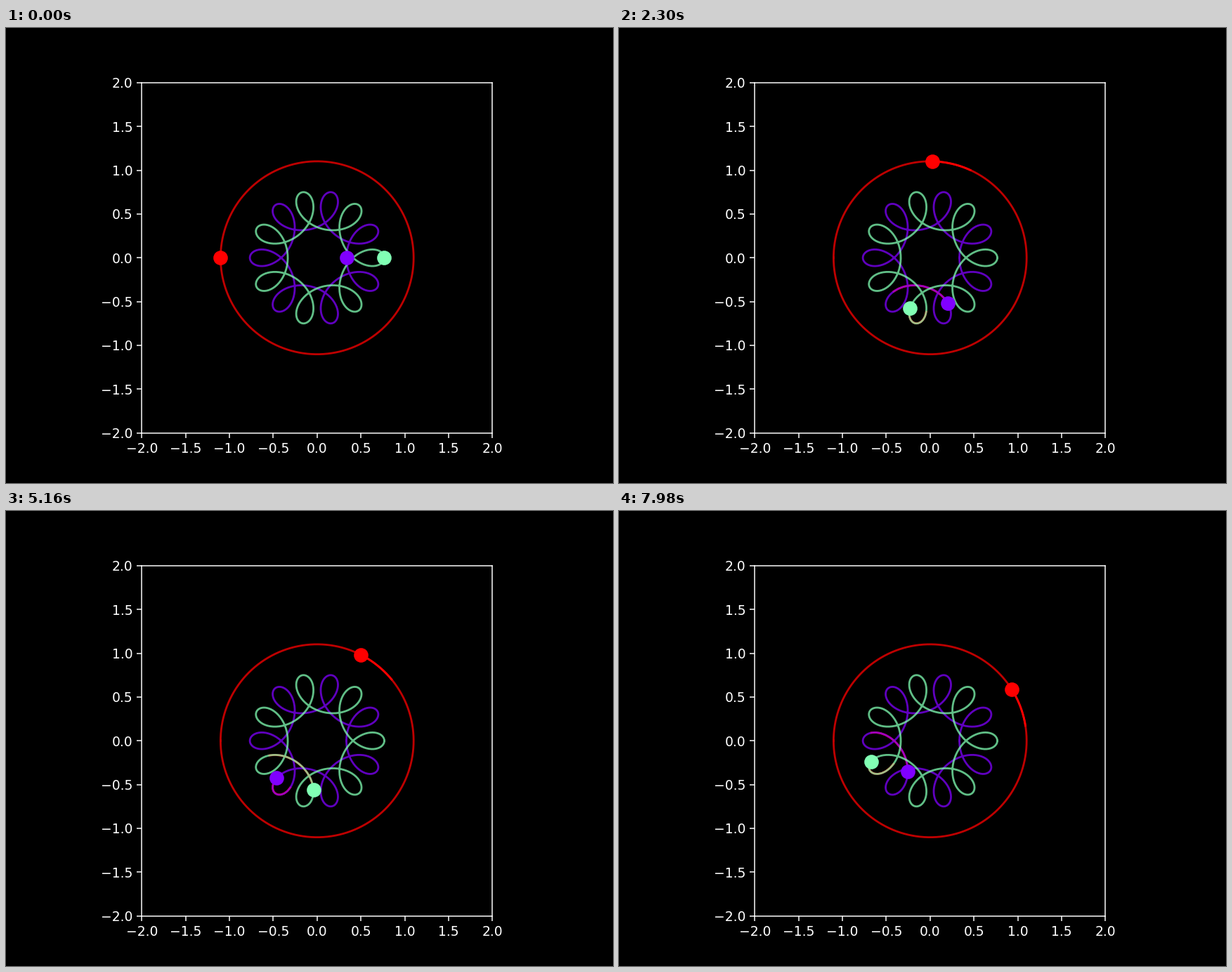
A matplotlib script for the animation above (8 s loop, 864x648 px).

```python
import numpy as np
import matplotlib.pyplot as plt
from matplotlib.animation import FuncAnimation

FRAMES, STEP_MS = 400, 20
STEP = np.radians(2.3368)   # turn of the outer body per frame
TRAIL = 10
R_OUT = 1.1015              # radius of the outer orbit
R_PAIR = 0.2175             # mean half distance of the inner pair
PETALS = 7
COLORS = plt.cm.rainbow(np.linspace(0, 1, 3))


def bodies(turn):
    """Complex positions of both inner bodies and the outer one."""
    outer = -R_OUT * np.exp(1j * turn)
    # retrograde pair with a slight tidal ripple
    ripple = 2 * PETALS * turn
    size = R_PAIR * (1 - 0.0058 * np.cos(ripple))
    angle = -(PETALS - 1) * turn - 0.0075 * np.sin(ripple)
    arm = size * np.exp(1j * angle)
    return [-outer / 2 - arm, -outer / 2 + arm, outer]


plt.style.use("dark_background")
fig, ax = plt.subplots(figsize=(6.4, 4.8), dpi=135)
ax.set_aspect("equal")
ax.set_xlim(-2, 2)
ax.set_ylim(-2, 2)
ticks = np.arange(-2, 2.1, 0.5)
ax.set_xticks(ticks)
ax.set_yticks(ticks)

trails = [ax.plot([], [], color="red", lw=1.5, zorder=2)[0] for _ in COLORS]
for z, c in zip(bodies(np.linspace(0, 2 * np.pi, 600)), COLORS):
    ax.plot(z.real, z.imag, color=c, lw=1.5, alpha=0.75, zorder=3)
dots = [ax.plot([], [], "o", color=c, ms=10, zorder=4)[0] for c in COLORS]


def update(i):
    path = bodies(STEP * np.arange(max(0, i - TRAIL), i + 1))
    for z, trail, dot in zip(path, trails, dots):
        trail.set_data(z.real, z.imag)
        dot.set_data(z.real[-1:], z.imag[-1:])
    return trails + dots


def init():
    return update(0)


anim = FuncAnimation(fig, update, frames=FRAMES, init_func=init,
                     interval=STEP_MS, repeat=True, repeat_delay=0)
plt.show()
```
